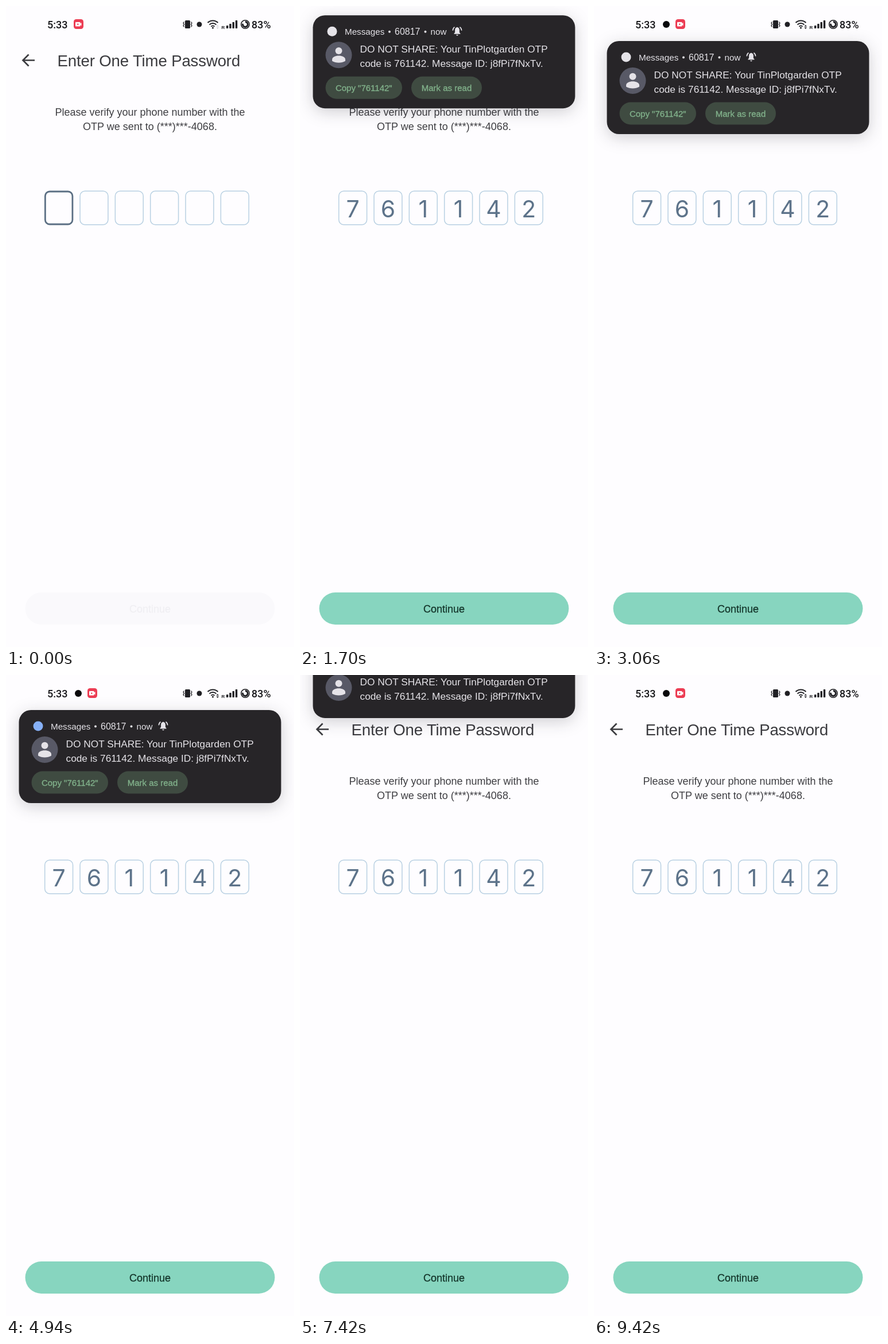
An HTML page that plays this animation: 502x1116 px, repeating every 9510 ms.

```html
<!DOCTYPE html>
<html lang="en">
<head>
<meta charset="utf-8">
<title>One-time password</title>
<style>
  html, body { margin: 0; width: 100%; height: 100%; overflow: hidden; background: #fefdff; }
  svg { display: block; width: 502px; height: 1116px; font-family: "Liberation Sans", Arial, sans-serif; }
  text { white-space: pre; }
  .status { font: 500 18px Roboto, sans-serif; fill: #18181b; }
  .body { font-size: 18px; fill: #3d3d41; text-anchor: middle; }
  .digit { font: 41px Inter, sans-serif; fill: #5d738a; text-anchor: middle; }
  .medium { stroke: currentColor; stroke-width: .35px; fill: currentColor; }
  #card { filter: drop-shadow(0 6px 14px rgba(20, 18, 30, .2)); }
  .message { font-size: 17.3px; }
  .head { font-size: 15.2px; }
  .chip { font-size: 15px; color: #80b08a; }
</style>
</head>
<body>
<svg viewBox="0 0 502 1116">
  <rect width="502" height="1116" fill="#fefdff"/>

  <g id="status" fill="#202024">
    <text class="status" x="72" y="39">5:33</text>
    <circle id="notice" cx="126" cy="32" r="6" fill="#09090b"/>
    <g id="recorder">
      <rect x="118" y="23" width="17" height="17" rx="4.5" fill="#ec3c53"/>
      <path d="M122 28h6.5a1 1 0 0 1 1 1v1.5l2-1.5v5.5l-2-1.5v1.5a1 1 0 0 1-1 1H122a1 1 0 0 1-1-1V29a1 1 0 0 1 1-1z" fill="#fff"/>
      <circle cx="125.3" cy="31.7" r="1.3" fill="#ec3c53"/>
    </g>
    <rect x="312" y="25" width="9" height="14" rx="1.5"/>
    <path d="M310.5 27.5l-1.5 2.2 1.5 2.3-1.5 2.3 1.5 2.2M322.5 27.5l1.5 2.2-1.5 2.3 1.5 2.3-1.5 2.2" fill="none" stroke="#202024" stroke-width="1.3"/>
    <circle cx="337" cy="32" r="4.5"/>
    <path d="M351.5 29a13 13 0 0 1 18 0M354.5 32.6a8.500 8.500 0 0 1 12 0M357.5 35.7a4.300 4.300 0 0 1 6 0" fill="none" stroke="#202024" stroke-width="2"/>
    <circle cx="360.5" cy="38" r="1.6"/>
    <path id="up" d="M366.5 35.7l2.3-2.7 2.3 2.7z"/>
    <path id="down" d="M366.5 37.2h4.6l-2.300 2.700z"/>
    <text x="375.5" y="40" font-size="8" font-weight="bold">R</text>
    <g id="bars"></g>
    <circle cx="417" cy="32" r="7.2" fill="none" stroke="#202024" stroke-width="1.6"/>
    <path d="M417 27.6a4.400 4.400 0 1 1-4.200 3.100" fill="none" stroke="#202024" stroke-width="3"/>
    <text class="status" x="428" y="39">83%</text>
  </g>

  <path d="M50 94.500H30M39.500 84.500l-10 10 10 10" fill="none" stroke="#3b3b3f" stroke-width="2.7"/>
  <text x="89.500" y="105" font-size="27.6" letter-spacing="-.15" fill="#3b3b3f">Enter One Time Password</text>
  <text class="body" x="251" y="191">Please verify your phone number with the</text>
  <text class="body" x="251" y="216">OTP we sent to (***)***-4068.</text>

  <g id="fields"></g>

  <rect id="button" x="33.5" y="1021" width="435" height="56" rx="28"/>
  <text id="label" class="medium" x="251" y="1056" font-size="18" text-anchor="middle">Continue</text>

  <g id="card" fill="#e5e3e8">
    <rect id="panel" x="22.5" y="61" width="457" rx="21" fill="#272528"/>
    <circle id="app" cx="56" cy="89" r="8.5"/>
    <text class="head" x="78" y="94.5">Messages</text>
    <circle cx="156" cy="89.5" r="2"/>
    <text class="head" x="165" y="94.5" style="font-size:16px">60817</text>
    <circle cx="218.5" cy="89.5" r="2"/>
    <text class="head" x="227.5" y="94.5">now</text>
    <path d="M268.5 93.500v-1l1.600-1.700v-4.300c0-2.300 1.300-3.900 3-4.400a1 1 0 0 1 1.800 0c1.700.5 3 2.100 3 4.400v4.300l1.600 1.700v1zM272.300 94.800h3.400a1.700 1.700 0 0 1-3.400 0z"/>
    <path d="M266.300 87.500q.1-4 3.200-6M281.700 87.500q-.1-4-3.200-6" fill="none" stroke="#e5e3e8" stroke-width="1.5"/>
    <circle cx="67.5" cy="130" r="23" fill="#585966"/>
    <circle cx="67.5" cy="122.7" r="6"/>
    <path d="M56 140.500v-2.500c0-9 23-9 23 0v2.500c-6 4-17 4-23 0z"/>
    <text class="message" x="104.5" y="126">DO NOT SHARE: Your TinPlotgarden OTP</text>
    <text class="message" x="104.5" y="151">code is 761142. Message ID: j8fPi7fNxTv.</text>
    <g id="actions">
      <rect x="44.5" y="167.5" width="133.5" height="39" rx="19.5" fill="#3f4b41"/>
      <rect x="194" y="167.5" width="123" height="39" rx="19.5" fill="#3f4b41"/>
      <text class="chip medium" x="111.3" y="192.5" text-anchor="middle">Copy "761142"</text>
      <text class="chip medium" x="255.5" y="192.5" text-anchor="middle">Mark as read</text>
    </g>
  </g>
</svg>
<script>
const LOOP = 9510;
const FILL = 1000, ENABLE = 1330, ENTER = 1551, NOTICE = 1640, TINT = 4400;
const LEAVE = 7190, FOLDED = 7400, GONE = 7610;
const NS = 'http://www.w3.org/2000/svg';
const $ = id => document.getElementById(id);

function set(el, attrs) {
  for (const key in attrs) el.setAttribute(key, attrs[key]);
  return el;
}

function add(parent, tag, attrs) {
  return parent.appendChild(set(document.createElementNS(NS, tag), attrs));
}

const shown = on => on ? 'visible' : 'hidden';

function smooth(t, from, to) {
  const p = Math.min(1, Math.max(0, (t - from) / (to - from)));
  return p * p * (3 - 2 * p);
}

for (let i = 0; i < 4; i++) {
  const height = 5 + i * 3;
  add($('bars'), 'rect', { x: 384 + i * 5.3, y: 39 - height, width: 3.4, height, rx: .7 });
}

const fields = [...'761142'].map((digit, i) => {
  const x = 66.9 + i * 61.35;
  const box = add($('fields'), 'rect', { fill: 'none' });
  const text = add($('fields'), 'text', { class: 'digit', x: x + 25.2, y: 367.5 });
  text.textContent = digit;
  return { x, box, text };
});

// The border grows inwards from a fixed outer edge
function outline({ x, box }, stroke, width) {
  set(box, {
    x: x + width / 2, y: 321.6 + width / 2,
    width: 50.4 - width, height: 59.8 - width,
    rx: 9.2 - width / 2, stroke, 'stroke-width': width
  });
}

// Critically damped entry, smooth exit
function cardOffset(t) {
  const k = (t - ENTER) * .0202;
  return -230 * (1 + k) * Math.exp(-k) - 188 * smooth(t, LEAVE, GONE);
}

function render(t) {
  const filled = t >= FILL, enabled = t >= ENABLE, noticed = t >= NOTICE;

  fields.forEach((field, i) => {
    if (!filled && i === 0) outline(field, '#5b6f83', 2.8);
    else outline(field, '#b8d0e2', 1.5);
    set(field.text, { visibility: shown(filled) });
  });

  set($('button'), { fill: enabled ? '#87d5bf' : '#faf9fc' });
  set($('label'), { color: enabled ? '#16382d' : '#f0eff3' });

  set($('notice'), { visibility: shown(noticed) });
  set($('recorder'), { transform: `translate(${noticed ? 24 : 0} 0)` });
  set($('up'), { fill: t < 210 ? '#d4d4d8' : '#202024' });
  set($('down'), { fill: noticed ? '#202024' : '#d4d4d8' });

  const fold = smooth(t, LEAVE, FOLDED);
  set($('panel'), { height: 162 - 40 * fold });
  set($('actions'), { opacity: Math.max(0, 1 - 2 * fold) });
  set($('card'), {
    transform: `translate(0 ${cardOffset(t).toFixed(2)})`,
    visibility: shown(t >= ENTER && t < GONE)
  });
  set($('app'), { fill: t < TINT ? '#e5e3e8' : '#86b0f6' });
}

function tick() {
  render(performance.now() % LOOP);
  requestAnimationFrame(tick);
}
tick();
</script>
</body>
</html>
```
